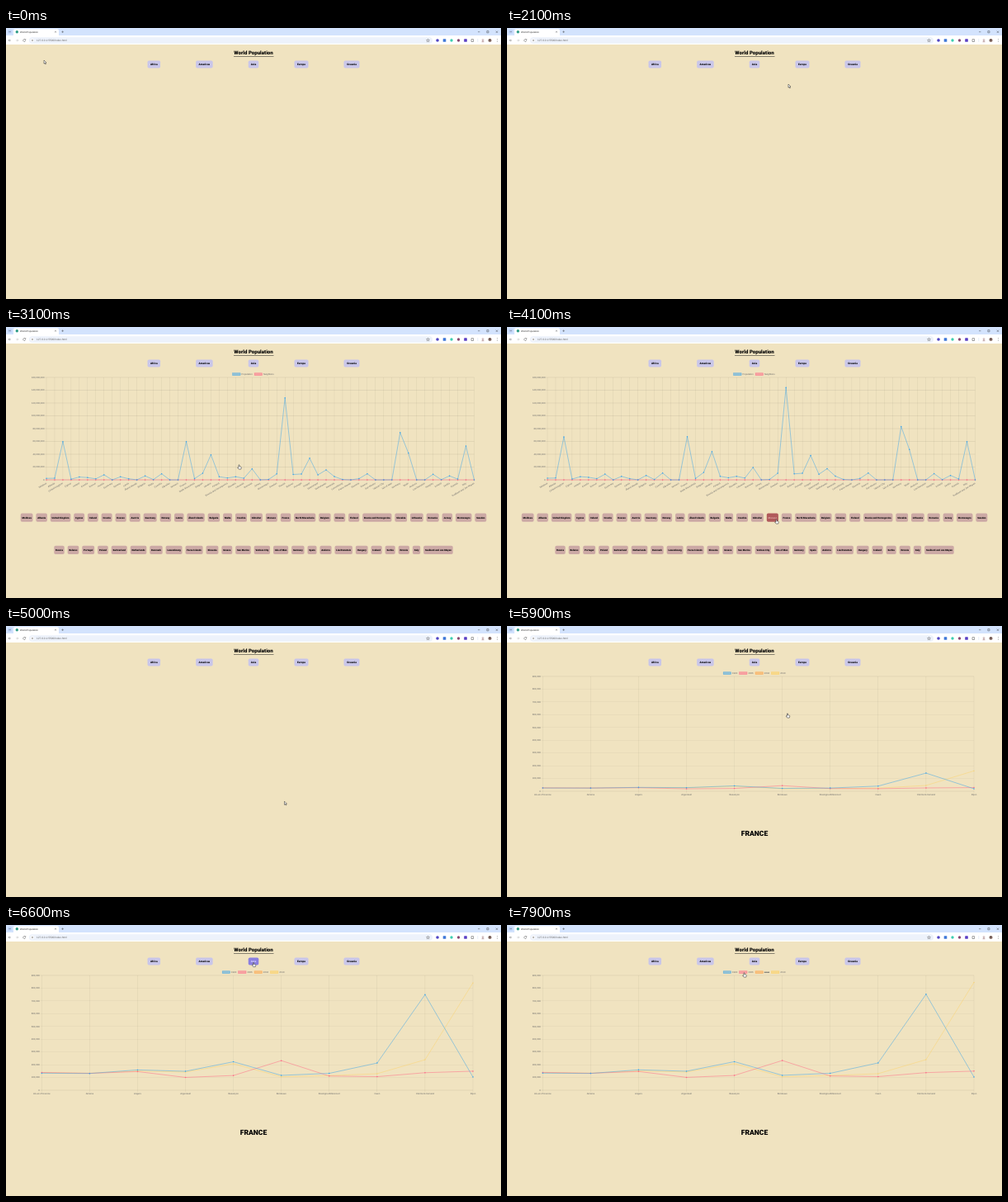
An HTML page with a canvas that plays this animation: 600x328 px, repeating every 8 s.

```html
<!DOCTYPE html>
<html lang="en">
<head>
<meta charset="utf-8">
<title>World Population</title>
<style>
html, body { margin: 0; width: 100%; height: 100%; overflow: hidden; background: #f0e3c0; }
canvas { display: block; width: 600px; height: 328px; }
</style>
</head>
<body>
<canvas id="stage" width="600" height="328"></canvas>
<script>
const ctx = document.getElementById('stage').getContext('2d');
ctx.textRendering = 'geometricPrecision';

const LOOP = 8000;
const EUROPE_AT = 2680, CLEARED_AT = 4600, FRANCE_AT = 5850, STRIKE_AT = 7500;
const HEAVY = 'Roboto, sans-serif', PLAIN = '"Liberation Sans", sans-serif';
const BLUE = '54,162,235', PINK = '255,99,132', ORANGE = '255,159,64', YELLOW = '255,205,86';

// Name and population in millions; the first 29 form the upper button row.
const countries = `Moldova 2.6,Albania 2.8,United Kingdom 67.2,Cyprus 1.2,Ireland 5,Croatia 4,Kosovo 1.8,
Austria 8.9,Guernsey 0,Norway 5.4,Latvia 1.9,Åland Islands 0,Bulgaria 6.9,Malta .5,Czechia 10.7,
Gibraltar 0,Monaco 0,France 67.4,North Macedonia 2.1,Belgium 11.6,Ukraine 44.1,Finland 5.5,
Bosnia and Herzegovina 3.3,Slovakia 5.5,Lithuania 2.8,Romania 19.3,Jersey .1,Montenegro .6,Sweden 10.4,
Russia 144.1,Belarus 9.4,Portugal 10.3,Poland 38,Switzerland 8.7,Netherlands 17.4,Denmark 5.8,
Luxembourg .6,Faroe Islands 0,Slovenia 2.1,Greece 10.7,San Marino 0,Vatican City 0,Isle of Man .1,
Germany 83.2,Spain 47.4,Andorra .1,Liechtenstein 0,Hungary 9.7,Iceland .4,Serbia 6.9,Estonia 1.3,
Italy 59.6,Svalbard and Jan Mayen 0`.split(',').map(entry => {
  const [, name, millions] = entry.trim().match(/(.+) (\S+)$/);
  return { name, millions: +millions };
});

const europeChart = {
  left: 49, right: 567.5, bottom: 185, max: 160, step: 20, unit: ',000,000', tilt: true,
  labels: countries.map(c => c.name),
  legendX: 274.7,
  series: [
    { name: 'Population', color: BLUE, data: countries.map(c => c.millions) },
    { name: 'Neighbors', color: PINK, data: countries.map(() => 0) },
  ],
};

const franceChart = {
  left: 43.3, right: 566, bottom: 200, max: 900, step: 100, unit: ',000',
  labels: ['Aix-en-Provence', 'Amiens', 'Angers', 'Argenteuil', 'Besançon', 'Bordeaux',
    'Boulogne-Billancourt', 'Caen', 'Clermont-Ferrand', 'Dijon'],
  legendX: 262.2,
  series: [
    { name: '1990', color: BLUE, data: [134, 132, 160, 149, 224, 117, 133, 214, 752, 104] },
    { name: '2006', color: PINK, data: [140, 133, 147, 101, 116, 233, 112, 107, 138, 150] },
    { name: '2004', color: ORANGE, data: [] },
    { name: '2010', color: YELLOW, faint: true, data: [139, 134, 152, 143, 208, 106, 115, 130, 240, 845] },
  ],
};

// Pointer stops: time, x, y
const pointerStops = [
  [0, 46, 39], [850, 46, 39], [1350, 200, 108], [1450, 200, 108], [2100, 341, 68], [2300, 349, 58],
  [2450, 358, 45], [2700, 358, 45], [3100, 282.5, 167], [3450, 290, 195], [4100, 326.5, 233],
  [4300, 337, 232], [4700, 337, 232], [5900, 340, 106], [6150, 335, 90], [6550, 300, 45.5],
  [6800, 300, 46], [7300, 314, 57], [7600, 314, 57], [7850, 287.5, 58], [8000, 287.5, 58],
];

function text(str, x, y, size, { color = '#000', weight = 400, family = PLAIN, align = 'left' } = {}) {
  ctx.font = `${weight} ${size}px ${family}`;
  ctx.fillStyle = color;
  ctx.textAlign = align;
  ctx.textBaseline = 'middle';
  ctx.fillText(str, x, y);
}

function box(x, y, w, h, color, radius = 0) {
  ctx.fillStyle = color;
  ctx.beginPath();
  ctx.roundRect(x, y, w, h, radius);
  ctx.fill();
}

function dot(x, y, r, color) {
  ctx.fillStyle = color;
  ctx.beginPath();
  ctx.arc(x, y, r, 0, 7);
  ctx.fill();
}

function stroke(path, color, width) {
  ctx.strokeStyle = color;
  ctx.lineWidth = width;
  ctx.stroke(new Path2D(path));
}

function drawBrowser() {
  box(0, 0, 600, 10, '#d3e3fd');
  box(0, 9, 600, 11, '#fff');
  box(9, 1.3, 55, 9, '#fff', [2, 2, 0, 0]);
  box(2, 2, 5, 5, '#c0d5f8', 1.3);
  stroke('M3.7 4.2l.9 .9 .9-.9', '#222', .5);
  dot(13.3, 4.7, 1.7, '#2f9c86');
  text('World Population', 17, 4.9, 2.9, { color: '#333' });
  stroke('M59.2 3.9l1.6 1.6m0-1.6l-1.6 1.6M67.3 4.7h2.6m-1.3-1.3v2.6', '#333', .4);
  stroke('M572 4.7h2.4M582.8 3.6h2.2v2.2h-2.2zM593.8 3.6l2.3 2.3m0-2.3l-2.3 2.3', '#222', .4);

  stroke('M6 15h-2.8l1.2-1.2m-1.2 1.2l1.2 1.2', '#555', .45);
  stroke('M12 15h2.8l-1.2-1.2m1.2 1.2l-1.2 1.2', '#aaa', .45);
  stroke('M23.5 14.2a1.5 1.5 0 1 0 .2 1.2M23.8 13.2v1.2h-1.2', '#444', .45);
  box(28, 11.3, 489, 7.4, '#edf2fb', 3.7);
  dot(32, 15, 2.2, '#fff');
  stroke('M30.9 14.4h2.2m-2.2 1.2h2.2', '#444', .4);
  text('127.0.0.1:5500/index.html', 37, 15.1, 3.2, { color: '#666' });
  stroke('M511.5 13.2l.6 1.2 1.3 .2-1 .9 .3 1.3-1.2-.7-1.2 .7 .3-1.3-1-.9 1.3-.2z', '#444', .4);

  dot(523, 15, 1.8, '#5146c4');
  box(529.7, 13.2, 3.6, 3.6, '#3f78d8', .4);
  dot(540, 15, 1.7, '#3dcfb0');
  dot(548.5, 15, 1.7, '#8a4a72');
  box(555.2, 13.2, 3.6, 3.6, '#5a3fc4', .6);
  stroke('M564 13.7h2.6v2.8h-2.6z', '#444', .5);
  stroke('M571.8 13v4', '#c3d5f3', .4);
  stroke('M578 13.2v2.4m-1-1l1 1 1-1M576.6 16.7h2.8', '#7a3f42', .5);
  dot(586.5, 15, 2.1, '#8b7068');
  dot(586.5, 14.5, .8, '#4c3a38');
  for (const y of [13.7, 15, 16.3]) dot(595.3, y, .35, '#333');
}

function drawButton(label, x, y, w, h, size, colors, pointer) {
  const hovered = Math.abs(pointer.x - x - w / 2) < w / 2 && Math.abs(pointer.y - y - h / 2) < h / 2;
  box(x, y, w, h, hovered ? colors.hover : colors.rest, 1.8);
  text(label, x + w / 2, y + h / 2 + .1, size,
    { weight: 900, family: HEAVY, align: 'center', color: hovered ? colors.hoverText : '#000' });
  return hovered;
}

function drawHeader(pointer) {
  text('World Population', 300, 30.2, 6.1, { weight: 900, family: HEAVY, align: 'center' });
  box(276, 33.9, 48.5, .6, '#222');
  const colors = { rest: '#c9c6e9', hover: '#8a7fe0', hoverText: '#dcd8ff' };
  const regions = [['Africa', 179.3, 15.5], ['Americas', 240.4, 20.5], ['Asia', 300, 12.5],
    ['Europe', 358, 17], ['Oceania', 419, 19]];
  return regions.map(([name, x, w]) => drawButton(name, x - w / 2, 39.4, w, 9.2, 3.2, colors, pointer))
    .some(Boolean);
}

// Spreads buttons over the row with equal gaps.
function drawCountryRow(names, left, right, y, pointer) {
  const colors = { rest: '#cca9a5', hover: '#b0595a', hoverText: '#dfaaa6' };
  ctx.font = `900 2.9px ${HEAVY}`;
  const widths = names.map(name => ctx.measureText(name).width + 3.6);
  const gap = (right - left - widths.reduce((a, b) => a + b)) / (names.length - 1);
  let x = left, hovered = false;
  names.forEach((name, i) => {
    hovered = drawButton(name, x, y, widths[i], 10.2, 2.9, colors, pointer) || hovered;
    x += widths[i] + gap;
  });
  return hovered;
}

function drawLegend(chart, struck) {
  let x = chart.legendX;
  for (const { name, color } of chart.series) {
    box(x, 55.8, 9.4, 2.8, `rgba(${color},.5)`);
    ctx.strokeStyle = `rgba(${color},.8)`;
    ctx.lineWidth = .5;
    ctx.strokeRect(x, 55.8, 9.4, 2.8);
    text(name, x + 10.8, 57.3, 2.81, { color: '#666' });
    const width = ctx.measureText(name).width;
    if (name === struck) box(x + 10.8, 57, width, .5, '#555');
    x += 10.8 + width + 2.4;
  }
}

function drawChart(chart, age, struck) {
  const { left, right, bottom, max, step, labels } = chart;
  const top = 61, grow = 1 - (1 - Math.min(age / 1000, 1)) ** 4;
  const px = i => left + (right - left) * i / (labels.length - 1);
  const py = v => bottom - (bottom - top) * v / max;

  for (let v = 0; v <= max; v += step) {
    box(left - 1.9, py(v) - .15, right - left + 1.9, .3, 'rgba(0,0,0,.13)');
    text(v ? v + chart.unit : '0', left - 2.5, py(v), 2.81, { color: '#666', align: 'right' });
  }
  labels.forEach((label, i) => {
    box(px(i) - .15, top, .3, bottom - top + 1.9, 'rgba(0,0,0,.13)');
    ctx.save();
    ctx.translate(px(i), bottom + (chart.tilt ? 4 : 4.7));
    if (chart.tilt) ctx.rotate(-Math.PI / 6);
    text(label, 0, 0, 2.81, { color: '#666', align: chart.tilt ? 'right' : 'center' });
    ctx.restore();
  });

  for (const { data, color, faint } of [...chart.series].reverse()) {
    ctx.beginPath();
    data.forEach((v, i) => ctx.lineTo(px(i), py(v * grow)));
    ctx.strokeStyle = `rgba(${color},${faint ? .65 : .8})`;
    ctx.lineWidth = .6;
    ctx.stroke();
    data.forEach((v, i) => dot(px(i), py(v * grow), faint ? .5 : .75, `rgb(${color})`));
  }
  drawLegend(chart, struck);
}

function pointerAt(t) {
  const next = pointerStops.findIndex(stop => stop[0] > t);
  const [t0, x0, y0] = pointerStops[next - 1], [t1, x1, y1] = pointerStops[next];
  const p = (t - t0) / (t1 - t0), eased = p * p * (3 - 2 * p);
  return { x: x0 + (x1 - x0) * eased, y: y0 + (y1 - y0) * eased };
}

function drawPointer({ x, y }, hand) {
  const shape = new Path2D(hand
    ? 'M-.5 0q.6-.5 1 0v1.8l1.9 .5q.5 .2 .4 .8l-.5 2h-2.6l-1.6-2q.3-.7 1.4 .1z'
    : 'M0 0v4.2l1-.9 .7 1.5 .7-.3-.7-1.5h1.3z');
  ctx.save();
  ctx.translate(x, y);
  ctx.fillStyle = '#fff';
  ctx.strokeStyle = '#222';
  ctx.lineWidth = .5;
  ctx.fill(shape);
  ctx.stroke(shape);
  ctx.restore();
}

function draw(t) {
  const pointer = pointerAt(t);
  box(0, 0, 600, 328, '#f0e3c0');
  drawBrowser();
  let hand = drawHeader(pointer), chart = null;
  if (t >= EUROPE_AT && t < CLEARED_AT) {
    chart = europeChart;
    drawChart(chart, t - EUROPE_AT);
    const names = chart.labels;
    hand = drawCountryRow(names.slice(0, 29), 17.7, 582.3, 225.6, pointer) || hand;
    hand = drawCountryRow(names.slice(29), 58.3, 541.7, 264.8, pointer) || hand;
  } else if (t >= FRANCE_AT) {
    chart = franceChart;
    drawChart(chart, t - FRANCE_AT, t >= STRIKE_AT ? '2004' : null);
    text('FRANCE', 300, 251.4, 8.6, { weight: 900, family: HEAVY, align: 'center' });
  }
  hand ||= chart && pointer.y > 53 && pointer.y < 210;
  drawPointer(pointer, hand);
}

function tick() {
  draw(performance.now() % LOOP);
  requestAnimationFrame(tick);
}
tick();
</script>
</body>
</html>
```
